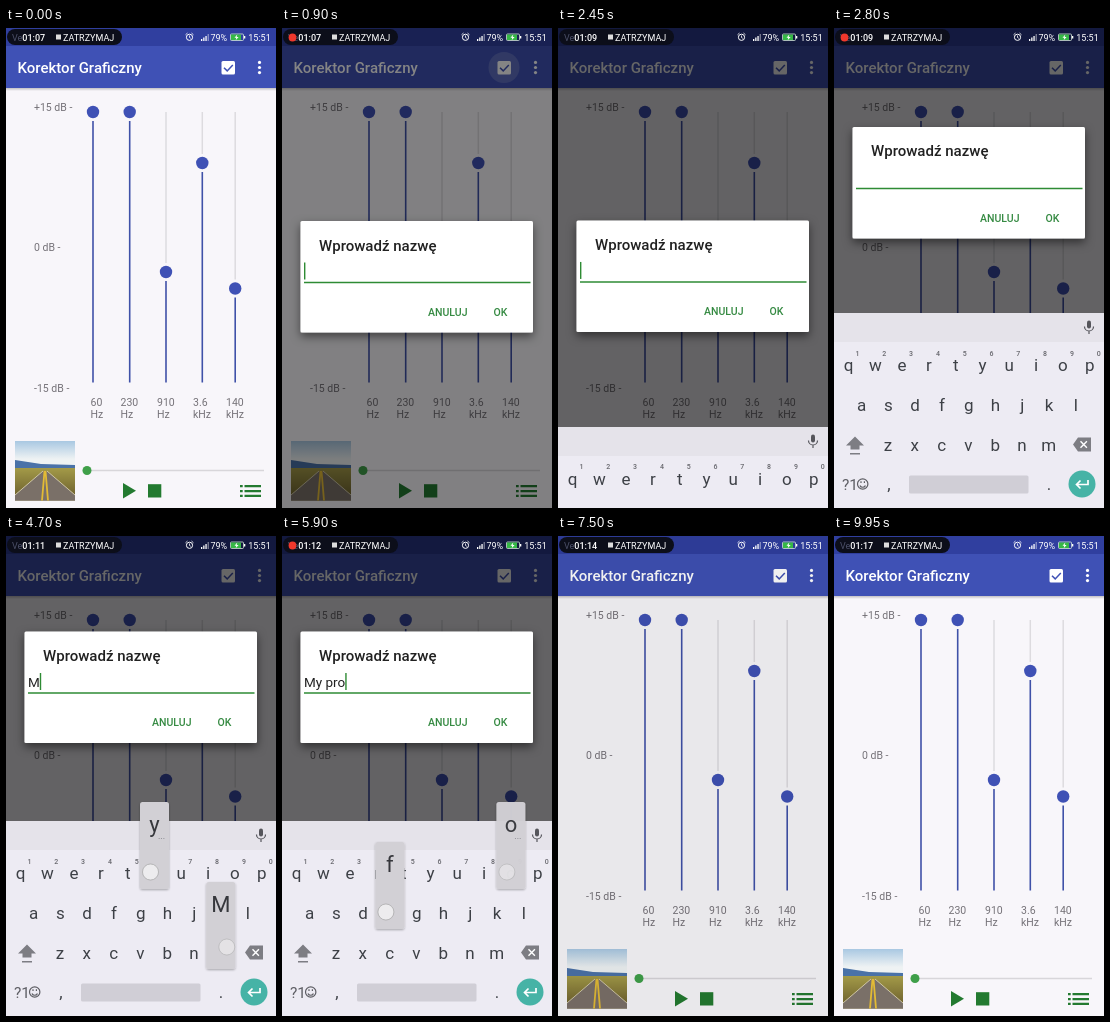
Write an HTML page that moves like this. It is 270x480 px and loops after 10 s.

```html
<!DOCTYPE html>
<html lang="pl">
<head>
<meta charset="utf-8">
<title>Korektor Graficzny</title>
<style>
html, body { margin: 0; width: 100%; height: 100%; overflow: hidden; background: #f8f6fa; }
svg { display: block; width: 270px; height: 480px; font-family: Roboto, sans-serif; }
text { white-space: pre; }
.title { font-size: 15px; font-weight: 500; }
.label { font-size: 10.5px; fill: #757278; }
.button { font-size: 10.5px; font-weight: 500; fill: #358a42; }
.status { font-size: 9px; fill: #fff; }
.key { font-size: 17px; fill: #3d4046; text-anchor: middle; }
.hint { font-size: 7px; font-weight: 500; fill: #66666c; text-anchor: middle; }
.caps .key { text-transform: uppercase; }
.anim { animation: 10s linear infinite; }
#dim { animation-name: dim; }
#dialog { animation-name: dialog; transform-box: fill-box; transform-origin: center; }
#keyboard { animation-name: keyboard; }
.touch { animation-name: touch; fill: #fff9; stroke: #9a9a9a99; }
.popup { animation-name: popup; }
.ripple { animation-name: ripple; fill: #fff; transform-box: fill-box; transform-origin: center; }
@keyframes dim {
  0%, 7% { opacity: 0 }
  9.5%, 73.3% { opacity: .6 }
  75.2%, 100% { opacity: 0 }
}
@keyframes dialog {
  0%, 7% { opacity: 0; transform: translateY(0) scale(.92) }
  9% { opacity: 1; transform: translateY(0) scale(1) }
  24.5% { transform: translateY(0) scale(1); animation-timing-function: cubic-bezier(.215, .61, .355, 1) }
  29.5% { transform: translateY(-97.5px) scale(1) }
  73% { opacity: 1; transform: translateY(-97.5px) scale(1) }
  74%, 100% { opacity: 0; transform: translateY(-97.5px) scale(1) }
}
@keyframes keyboard {
  0%, 23.5% { transform: translateY(200px); animation-timing-function: ease-out }
  27%, 73% { transform: none; animation-timing-function: ease-in }
  74.5%, 100% { transform: translateY(200px) }
}
@keyframes touch {
  0%, 2% { opacity: 1 }
  3.5%, 100% { opacity: 0 }
}
@keyframes popup {
  0%, 2.6% { opacity: 1 }
  3%, 100% { opacity: 0 }
}
@keyframes ripple {
  0% { opacity: .18; transform: scale(.3) }
  2.5% { opacity: .18; transform: scale(1) }
  7.5% { opacity: .15; transform: scale(1) }
  9.5%, 100% { opacity: 0; transform: scale(1) }
}
</style>
</head>
<body>
<svg viewBox="0 0 270 480">
  <defs>
    <linearGradient id="sky" x2="0" y2="1">
      <stop stop-color="#a9c8e2"/><stop offset=".6" stop-color="#eef2f3"/>
    </linearGradient>
    <linearGradient id="field" x2="0" y2="1">
      <stop stop-color="#a39a48"/><stop offset="1" stop-color="#66592a"/>
    </linearGradient>
    <linearGradient id="edge" x2="0" y2="1">
      <stop stop-color="#000" stop-opacity=".22"/><stop offset="1" stop-color="#000" stop-opacity="0"/>
    </linearGradient>
    <filter id="deep" x="-20%" y="-20%" width="140%" height="150%">
      <feDropShadow dx="0" dy="4" stdDeviation="5" flood-opacity=".5"/>
    </filter>
    <filter id="soft" x="-20%" y="-20%" width="140%" height="150%">
      <feDropShadow dx="0" dy="1" stdDeviation="1.2" flood-opacity=".3"/>
    </filter>
  </defs>

  <rect width="270" height="480" fill="#f8f6fa"/>
  <rect width="270" height="60" fill="#3f51b5"/>
  <rect width="270" height="18" fill="#303f9f"/>
  <rect y="60" width="270" height="3" fill="url(#edge)"/>
  <text class="title" x="11.5" y="45" fill="#fff">Korektor Graficzny</text>
  <circle class="anim ripple" cx="222" cy="39.5" r="15.5" style="animation-delay:-9650ms"/>
  <rect x="215.5" y="33" width="13.5" height="13.5" rx="1.5" fill="#fff"/>
  <path d="M218 39.7l3.2 3.2 5.6-6" fill="none" stroke="#3f51b5" stroke-width="1.5"/>
  <g fill="#fff">
    <circle cx="253.5" cy="34.4" r="1.6"/><circle cx="253.5" cy="39.5" r="1.6"/><circle cx="253.5" cy="44.6" r="1.6"/>
  </g>

  <g class="label">
    <text x="28" y="83">+15 dB -</text>
    <text x="28" y="223">0 dB -</text>
    <text x="28" y="363.8">-15 dB -</text>
  </g>
  <g id="sliders"></g>

  <!-- road picture -->
  <rect x="9" y="413" width="60" height="30" fill="url(#sky)"/>
  <path d="M9 432l26 4 34 1v6H9z" fill="#4a72a8"/>
  <path d="M9 440h60v32.500H9z" fill="url(#field)"/>
  <path d="M37 443h4l28 24v5.500H9V467z" fill="#7a7068"/>
  <path d="M37 443L9 467M41 443L69 467" stroke="#cfc6a6"/>
  <path d="M38.500 443L36 472.500M39.500 443L42 472.500" stroke="#e3bb35" stroke-width="1.800"/>

  <path d="M81 442.5H258" stroke="#d8d6da" stroke-width="1.5"/>
  <circle cx="81" cy="442.5" r="4.5" fill="#3f9f49"/>
  <g fill="#237a30">
    <path d="M117 455v15.5l13-7.75z"/>
    <rect x="142" y="456.2" width="13.3" height="13.3"/>
    <path id="row" d="M234 457h2.7v2.3H234zM238.5 457H255v2.3H238.5z"/>
    <use href="#row" y="4.9"/>
    <use href="#row" y="9.8"/>
  </g>

  <rect id="dim" class="anim" width="270" height="480"/>

  <g id="dialog" class="anim">
    <rect x="18.5" y="193" width="232.5" height="111.5" rx="1.5" fill="#fff" filter="url(#deep)"/>
    <text class="title" x="37" y="222.5" fill="#212121">Wprowadź nazwę</text>
    <text id="typed" x="22" y="248.4" font-size="13.5" fill="#212121"></text>
    <rect id="cursor" x="22" y="234.5" width="1.4" height="17" fill="#2e8b34"/>
    <path d="M22 254.5H248.5" stroke="#2e8b34" stroke-width="1.5"/>
    <text class="button" x="146" y="287.6">ANULUJ</text>
    <text class="button" x="211.5" y="287.6">OK</text>
  </g>

  <g id="keyboard" class="anim">
    <rect y="285" width="270" height="195" fill="#edebf3"/>
    <rect y="285" width="270" height="29" fill="#e5e3ea"/>
    <g stroke="#55555b" fill="none">
      <path d="M255 294.5v4" stroke-width="4" stroke-linecap="round"/>
      <path d="M250.500 298.5a4.5 4.5 0 0 0 9 0M255 303v3" stroke-width="1.2"/>
    </g>
    <g id="keys"></g>
    <g fill="#7d7d83">
      <path d="M21 408.5l9 9h-4.5v4h-9v-4H12zM16 425h10v1.5H16z"/>
      <path d="M239 416.5l5-7h13v14h-13z"/>
    </g>
    <path d="M246.5 413.3l6.4 6.4m0-6.4l-6.4 6.4" stroke="#fff" stroke-width="1.4"/>
    <text x="8" y="461.5" font-size="15.5" fill="#5d5d63">?1</text>
    <g fill="none" stroke="#5d5d63" stroke-width="1.2">
      <circle cx="28.7" cy="456" r="5.2"/>
      <path d="M26 457.5a2.8 2.4 0 0 0 5.4 0M27 453.3v1.6M30.4 453.3v1.6"/>
    </g>
    <text class="key" x="55" y="462">,</text>
    <rect x="75" y="447.5" width="119.5" height="18" rx="1.5" fill="#d0ced6"/>
    <text class="key" x="215" y="462">.</text>
    <circle cx="248" cy="456" r="13.5" fill="#46b3a6"/>
    <path d="M254 452v4.5h-11.5m4-4l-4 4 4 4" fill="none" stroke="#fff" stroke-width="1.7"/>
  </g>
  <g id="popups"></g>
  <g id="touches"></g>

  <g class="status">
    <g fill="none" stroke="#fff">
      <circle cx="183.5" cy="9.3" r="3.1"/>
      <path d="M183.5 7.5v2l1.3.8M179.5 6.8l2-1.8M187.5 6.8l-2-1.8" stroke-width=".8"/>
    </g>
    <path d="M195 13v-2h1.3v2zM197.2 13v-3.5h1.3V13zM199.4 13V8h1.3v5z"/>
    <path d="M201.6 13V6h1.3v7z" opacity=".45"/>
    <text x="204.5" y="12.7">79%</text>
    <rect x="224.5" y="6" width="13" height="6.5" rx="1" fill="none" stroke="#d5e8d8" stroke-width=".8"/>
    <rect x="225" y="6.5" width="10" height="5.5" fill="#36b846"/>
    <rect x="238" y="8" width="1.3" height="2.5"/>
    <path d="M231.3 6.5l-2.8 3.2h1.8l-.6 2.5 2.9-3.3h-1.900z"/>
    <text x="242.3" y="12.7">15:51</text>
    <rect x="1" y="1" width="115" height="16" rx="8" fill="#0c0e1a"/>
    <text x="6" y="12.7" fill="#4c5068">Ve</text>
    <circle id="rec" cx="10.5" cy="9.5" r="3.9" fill="#f0382c"/>
    <text id="clock" x="16.3" y="12.7" font-weight="500"></text>
    <rect x="50" y="6.5" width="5" height="5" fill="#ddd"/>
    <text x="57" y="12.7">ZATRZYMAJ</text>
  </g>
</svg>
<script>
const LOOP = 10000, start = performance.now();
const $ = id => document.getElementById(id);

function add(parent, tag, attrs, text) {
  const el = document.createElementNS('http://www.w3.org/2000/svg', tag);
  for (const k in attrs) el.setAttribute(k, attrs[k]);
  if (text) el.textContent = text;
  return parent.appendChild(el);
}
const from = ms => `animation-delay:${ms - LOOP}ms`;

// x, thumb y, label x, frequency, unit
const bands = [
  [87, 84, 84.5, '60', 'Hz'], [123.7, 84, 114.5, '230', 'Hz'], [160, 244, 151, '910', 'Hz'],
  [196.3, 135, 187, '3.6', 'kHz'], [229.2, 260.5, 220, '140', 'kHz']
];
for (const [x, y, lx, freq, unit] of bands) {
  const g = $('sliders');
  if (y > 93) add(g, 'path', { d: `M${x} 84V${y - 9}`, stroke: '#dddbdf', 'stroke-width': 1.5 });
  add(g, 'path', { d: `M${x} ${y + 9}V354.5`, stroke: '#3f51a8', 'stroke-width': 1.6 });
  add(g, 'circle', { cx: x, cy: y, r: 6.2, fill: '#3f51b5' });
  add(g, 'text', { class: 'label', x: lx, y: 377.8 }, freq);
  add(g, 'text', { class: 'label', x: lx, y: 390 }, unit);
}

const places = { ' ': [135, 456, 3] };
[['qwertyuiop', 14.5, 337], ['asdfghjkl', 27.5, 377], ['zxcvbnm', 54, 417]].forEach(([row, x0, y], r) => {
  [...row].forEach((ch, i) => {
    const x = x0 + i * 26.8;
    places[ch] = [x, y, r];
    add($('keys'), 'text', { class: 'key', x, y: y + 6 }, ch);
    if (r === 0) add($('keys'), 'text', { class: 'hint', x: x + 9, y: 327.5 }, String((i + 1) % 10));
  });
});

const presses = [
  [4450, 'M'], [4650, 'y'], [4950, ' '], [5200, 'p'], [5420, 'r'],
  [5640, 'o'], [5880, 'f'], [6100, 'i'], [6300, 'l'], [6520, 'e']
];
const typeDelay = 150;
const touch = (ms, cx, cy) => add($('touches'), 'circle', { class: 'anim touch', cx, cy, r: 8, style: from(ms) });

for (const [ms, ch] of presses) {
  const [x, y, row] = places[ch.toLowerCase()];
  touch(ms, x + (ch === 'M' ? 6 : -4), y - (ch === 'M' ? 6 : 1));
  if (ch === ' ') continue;
  const g = add($('popups'), 'g', { class: 'anim popup', style: from(ms) });
  add(g, 'rect', { x: x - 14.5, y: y - 71, width: 29, height: 87, rx: 2.5, fill: '#d2d0d5', filter: 'url(#soft)' });
  add(g, 'text', { x, y: y - 41, 'font-size': 22, fill: '#36373c', 'text-anchor': 'middle' }, ch);
  if (row === 0) add(g, 'text', { x: x + 7, y: y - 34, 'font-size': 9, fill: '#7d7d83', 'text-anchor': 'middle' }, '...');
}
touch(300, 222, 40);
touch(1850, 110, 243);
touch(3880, 21, 416);
touch(7000, 218, 192);

// time, seconds shown, recording light
const ticks = [
  [0, 7, 0], [800, 7, 1], [1350, 8, 0], [1850, 8, 1], [2350, 9, 0], [2650, 9, 1], [2900, 10, 0],
  [3400, 10, 1], [4400, 11, 0], [4900, 11, 1], [5300, 12, 0], [5600, 12, 1], [6000, 13, 0],
  [6450, 13, 1], [6900, 14, 0], [7650, 14, 1], [7900, 15, 0], [8400, 15, 1], [8900, 16, 0],
  [9400, 16, 1], [9900, 17, 0]
];
const blinkStarts = [850, 2100, ...presses.map(p => p[0] + typeDelay)];
const show = (el, on) => el.setAttribute('opacity', on ? 1 : 0);

function draw() {
  const t = (performance.now() - start) % LOOP;
  const [, sec, lit] = ticks.findLast(k => k[0] <= t);
  $('clock').textContent = '01:' + String(sec).padStart(2, '0');
  show($('rec'), lit);

  const typed = $('typed');
  typed.textContent = presses.filter(p => p[0] + typeDelay <= t).map(p => p[1]).join('');
  $('cursor').setAttribute('x', 22 + typed.getComputedTextLength());
  const since = t - (blinkStarts.findLast(b => b <= t) ?? 0);
  show($('cursor'), since % 1000 < 500);
  $('keyboard').classList.toggle('caps', t >= 3980 && t < 4600);
  requestAnimationFrame(draw);
}
draw();
</script>
</body>
</html>
```
